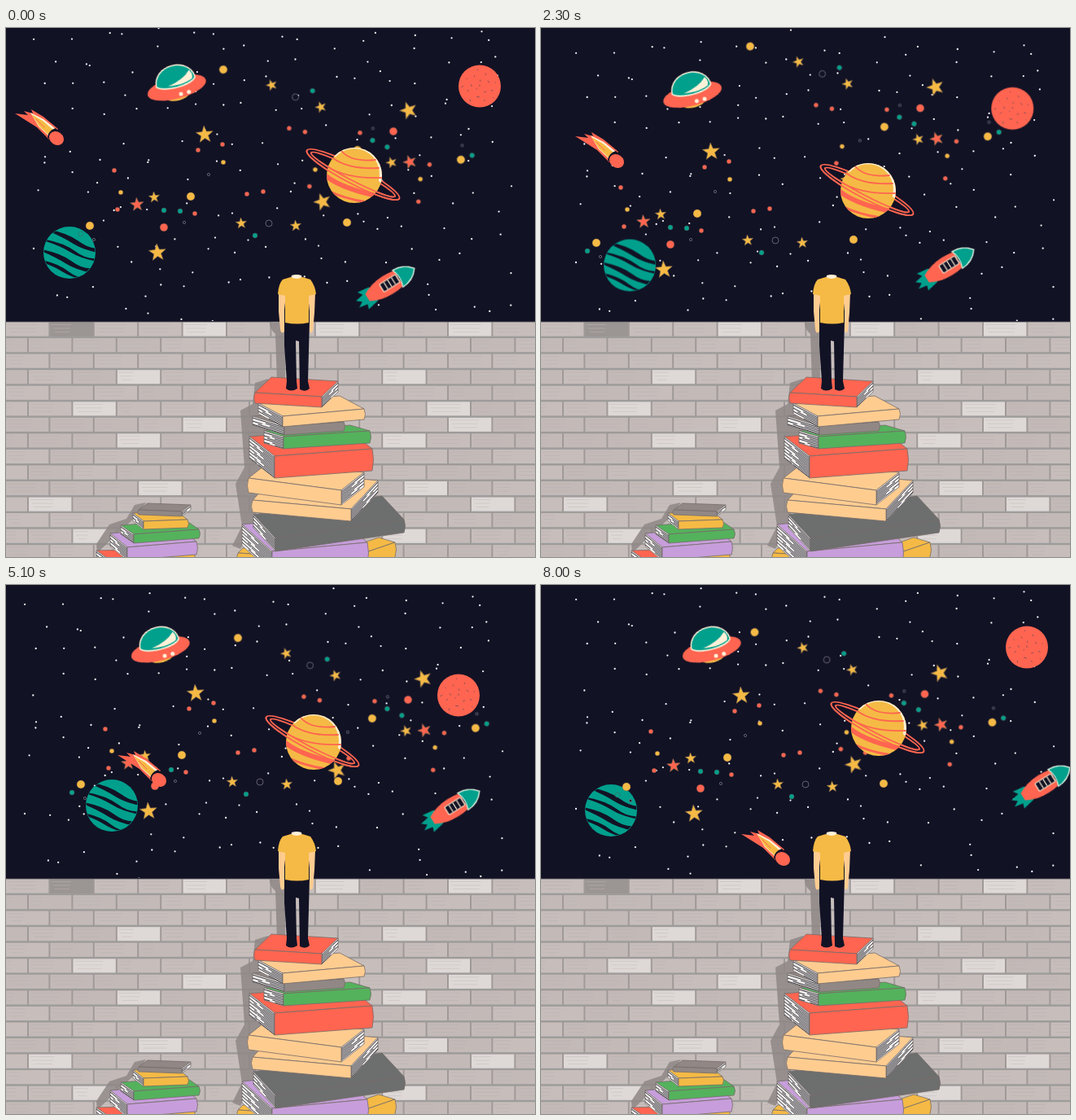
An HTML page for the animation above (8100 ms loop, 650x650 px).

```html
<!DOCTYPE html>
<html lang="en">
<head>
<meta charset="utf-8">
<title>Stacked books under the stars</title>
<style>
  html, body { margin: 0; width: 100%; height: 100%; overflow: hidden; background: #121225; }
  svg { display: block; width: 100%; height: 100%; }
  .red { fill: #ff6550; } .gold { fill: #f5ba45; } .teal { fill: #00a08d; }
  .cream { fill: #fff1d8; } .navy { fill: #121225; } .peach { fill: #ffcc90; }
  .green { fill: #54b25c; } .gray { fill: #918885; } .slate { fill: #6d6e6e; }
  .lilac { fill: #c79edb; } .paper { fill: #f1eeec; }
  .shade { fill: #8f8886; opacity: .85; }
  .line { fill: none; stroke-linecap: round; }
  .book { stroke: #756c6a; stroke-width: .8; stroke-linejoin: round; }
  .hatch { fill: none; stroke: #35323a; stroke-width: 1; }
  .mover { animation: 8.1s infinite; }
</style>
</head>
<body>
<svg viewBox="0 0 650 650">
  <defs>
    <clipPath id="globe"><circle cx="78" cy="276" r="31.500"/></clipPath>
    <clipPath id="gasball"><circle cx="428" cy="181" r="34"/></clipPath>
  </defs>
  <rect class="navy" width="650" height="650"/>
  <g id="dust" class="mover" fill="#f4f3f5"></g>

  <g id="moon" class="mover"><circle class="red" cx="582" cy="71.500" r="26"/></g>

  <g id="planet" class="mover">
    <circle class="teal" cx="78" cy="276" r="32"/>
    <g clip-path="url(#globe)" class="navy">
      <g id="bands" transform="translate(78 276) rotate(20)"></g>
    </g>
  </g>

  <g id="west" class="mover"></g>
  <g id="east" class="mover">
    <g id="turned" transform="translate(267 51) rotate(-158.500) scale(.988) translate(-419 -239)"></g>
  </g>

  <g id="comet" class="mover">
    <path class="red" d="M11 105L27 107L22 102L33 105L31 100L46 109L64 124L53 137L38 122Z"/>
    <path class="cream" d="M30 104L46 112L61 124L53 133L40 121Z"/>
    <path class="gold" d="M31 106L45 114L58 125L52 131L41 121Z"/>
    <path class="line" d="M37 112L47 122" stroke="#ff6550"/>
    <path class="navy" d="M51 134Q52 126 61 123L65 127Q56 129 54 138Z"/>
    <ellipse class="red" cx="62" cy="135.500" rx="9.500" ry="8" transform="rotate(35 62 135.500)"/>
  </g>

  <g id="saturn" class="mover">
    <g class="line" stroke="#ff6550" stroke-width="1.800" transform="rotate(27.500 426.500 180)">
      <ellipse cx="426.500" cy="180" rx="64" ry="11"/>
      <ellipse cx="426.500" cy="180" rx="58" ry="7"/>
    </g>
    <circle class="gold" cx="428" cy="181" r="34"/>
    <g clip-path="url(#gasball)" class="line" stroke="#ff6550">
      <path d="M404 155A34 34 0 0 1 461 187" stroke="#fff1d8" stroke-width="6"/>
      <path d="M412 151Q424 165 454 162M402 160Q421 174 458 172M394 170Q420 186 462 184" stroke-width="1.800"/>
      <path d="M392 181Q413 198 460 207" stroke-width="6"/>
      <path d="M396 200Q416 210 444 214" stroke-width="3"/>
    </g>
    <path class="line" d="M362.500 180A64 11 0 0 0 490.500 180M368.500 180A58 7 0 0 0 484.500 180"
      stroke="#ff6550" stroke-width="1.800" transform="rotate(27.500 426.500 180)"/>
  </g>

  <g id="ufo" class="mover">
    <g transform="rotate(-15 210 70)">
      <ellipse class="gold" cx="208" cy="84" rx="13" ry="5"/>
      <ellipse class="red" cx="209" cy="73" rx="37" ry="13.500"/>
      <path class="teal" d="M185 66C186 53 197 45.500 210 45.500S234 54 234 66C228 75 192 75 185 66Z" stroke="#fff1d8" stroke-width="1.500"/>
      <path class="cream" d="M199 69Q219 66 229 56Q233 62 230 67Q219 72 199 69Z"/>
      <circle class="cream" cx="212" cy="82" r="2.500"/>
      <circle class="cream" cx="222" cy="82" r="2.500"/>
    </g>
  </g>

  <g id="rocket" class="mover">
    <g transform="translate(467 317) rotate(-32)">
      <path class="teal" d="M-19 -10L-34 -12L-30 -6L-41 -4L-35 1L-42 5L-31 7L-33 13L-18 10L-12 0Z"/>
      <path class="red" d="M-27 -5Q-8 -16 18 -11V11Q-8 16 -27 5Z"/>
      <path class="teal" d="M17 -12Q32 -12 41 0Q32 12 17 12Q22 0 17 -12Z" stroke="#d7f0dd" stroke-width="1.300"/>
      <rect class="navy" x="-6" y="-6" width="23" height="11" rx="1" stroke="#fff1d8" stroke-width="1.200"/>
      <path class="line" d="M0 -5V4M5.500 -5V4M11 -5V4" stroke="#fff1d8" stroke-width="1.200"/>
    </g>
  </g>

  <g id="wall"><rect y="361" width="650" height="289" fill="#9f9997"/></g>
  <path class="shade" d="M324 362H343V440L333 436L331 376Q324 370 324 362Z"/>
  <path class="shade" d="M306 436L322 431V500L305 612L288 640L278 636L290 612L282 560L293 540L288 470L303 462Z"/>
  <path class="shade" d="M158 586L172 583L160 600L112 645L111 634L127 610L148 603Z"/>
  <g id="books"></g>

  <g id="person">
    <path class="peach" d="M335 325L344 328L342 346L342 373Q338 377 337 370L335 348Z"/>
    <path class="peach" d="M371 328L380 325L379 350L377 372Q375 377 373 372V348Z"/>
    <path class="navy" d="M342 360H373L371 434L373 443Q368 448 361 444L360 385L356 384L357 434L358 443Q350 448 344 443L345 434L342 390Z"/>
    <path class="cream" d="M351 304Q357 302 363 304L364 310H350Z"/>
    <path class="gold" d="M350 306Q357 310 364 306L374 309Q380 317 381 327L372 329V362Q358 365 343 362V329L334 327Q335 314 340 309Z"/>
  </g>
</svg>

<script>
const NS = 'http://www.w3.org/2000/svg';
const $ = id => document.getElementById(id);
const round = n => Math.round(n * 10) / 10;

function add(parent, tag, attrs) {
  const el = document.createElementNS(NS, tag);
  for (const k in attrs) el.setAttribute(k, attrs[k]);
  return parent.appendChild(el);
}

function seeded(s) {
  return () => (s = (s * 16807) % 2147483647) / 2147483647;
}

// White dust: one dot per jittered grid cell
function scatterDust() {
  const rnd = seeded(4127), cols = 17, rows = 11, w = 34.7, h = 36;
  for (let n = 0; n < cols * rows; n++)
    add($('dust'), 'circle', {
      cx: round(33 + (n % cols + rnd()) * w),
      cy: round(-17 + (Math.floor(n / cols) + rnd()) * h),
      r: 1.15
    });
}

function paintMoon() {
  const rnd = seeded(77);
  let d = '';
  for (let i = 0; i < 18; i++) {
    const a = i * 2.4, q = 5.4 * Math.sqrt(i);
    d += `M${round(582 + q * Math.cos(a))} ${round(71.5 + q * Math.sin(a))}l${round(rnd() * 3)} ${round(rnd() * 4 - 2)}`;
  }
  add($('moon'), 'path', { d, class: 'line', stroke: '#8d5058' });
}

function paintBands() {
  for (let i = 0; i < 4; i++) {
    const y = i * 13 - 18, t = 6 - i % 2 * 2;
    add($('bands'), 'path', { d: `M-34 ${y}Q-10 ${y - 4} 6 ${y + 1}T34 ${y}V${y + t}Q14 ${y + t + 3} 0 ${y + t}T-34 ${y + 2}Z` });
  }
}

function star(group, color, x, y, r) {
  let d = '';
  for (let i = 0; i < 10; i++) {
    const a = i * Math.PI / 5 - 1.65, q = i % 2 ? r * .42 : r;
    d += (i ? 'L' : 'M') + round(x + q * Math.cos(a)) + ' ' + round(y + q * Math.sin(a));
  }
  add(group, 'path', { d: d + 'Z', class: color, stroke: '#80694a', 'stroke-width': .7 });
}

function dot(group, color, x, y, r) {
  const look = color === 'ring'
    ? { fill: '#121225', stroke: '#77757f', 'stroke-width': .8 }
    : { class: color, stroke: '#66544a', 'stroke-width': .4 };
  add(group, 'circle', { cx: x, cy: y, r, ...look });
}

// Places are "x,y"; both clusters share this one layout
const cluster = [
  [star, 'gold', 11, '244,131 186,276'],
  [star, 'gold', 7, '182,208 289,240 356,243'],
  [star, 'red', 8.5, '161,217'],
  [dot, 'gold', 5, '227,207 419,239 103,243'],
  [dot, 'gold', 2.8, '267,165 141,202'],
  [dot, 'red', 4.8, '194,245'],
  [dot, 'red', 2.7, '133,175 236,150 266,143 137,223 232,228 296,204 316,201'],
  [dot, 'teal', 3, '194,224 214,225 306,255 92,253'],
  [dot, 'ring', 4, '323,240'],
  [dot, 'ring', 1.6, '249,180 219,239 108,260']
];

function drawCluster(group) {
  for (const [make, color, r, places] of cluster)
    for (const p of places.split(' ')) make(group, color, ...p.split(',').map(Number), r);
}

// Pale bricks per row: [first column, stride]
const pale = { 0: [4, 3], 3: [2, 6], 5: [1, 8], 6: [4, 6], 7: [2, 6], 10: [3, 6], 11: [0, 10], 13: [1, 7] };

function layBricks() {
  const wall = $('wall'), rnd = seeded(911), w = 54.4, h = 19.55;
  for (let row = 0; row < 15; row++) {
    const y = 360.5 + row * h, [first, stride] = pale[row] || [99, 1];
    for (let col = -1; col < 12; col++) {
      const x = (row % 2 ? 27 : -1) + col * w;
      const light = col >= first && (col - first) % stride === 0;
      const fill = light ? '#ded8d6' : row + col === 1 && !row ? '#9b9593' : rnd() < .5 ? '#c7bebc' : '#c3bab8';
      add(wall, 'rect', { x: round(x + 1), y: round(y + 1), width: w - 2, height: h - 2.4, fill });
      const len = 14 + rnd() * 26;
      let d = '';
      for (let k = 0; k < 3; k++) d += `M${round(x + 3 + k * 2)} ${round(y + 4 + k * 4.5)}h${round(len - k * 3)}`;
      add(wall, 'path', { d, class: 'line', stroke: light ? '#c6bfbd' : '#b9b0af', 'stroke-width': .6 });
    }
    add(wall, 'path', { d: `M0 ${round(y + h - .6)}H650`, class: 'line', stroke: '#9aa3a2', 'stroke-width': .7 });
  }
  add(wall, 'rect', { y: 360, width: 650, height: 1.2, fill: '#2b2a38' });
}

// A box: spine edge from (ax, ay) to (bx, by), depth (dx, dy), thickness h.
// Pages show on the end that the depth leans towards.
function book(color, ax, ay, bx, by, dx, dy, h) {
  const g = add($('books'), 'g', { class: 'book' });
  const [ex, ey] = dx < 0 ? [ax, ay] : [bx, by];
  const bow = dx < 0 ? 3 : -3;
  add(g, 'path', { class: color, d: `M${ax} ${ay}L${bx} ${by}l${dx} ${dy}L${ax + dx} ${ay + dy}Z` });
  add(g, 'path', { class: 'paper', d: `M${ex} ${ey}l${dx} ${dy}v${h}l${-dx} ${-dy}Z` });
  let d = '';
  for (let i = 1; i < h / 2; i++) {
    const s = .35 + i * .37 % .5;
    d += `M${ex} ${ey + i * 2}l${round(dx * s)} ${round(dy * s)}`;
    if (i % 2) d += `M${ex + dx} ${ey + dy + i * 2}l${round(-dx * .3)} ${round(-dy * .3)}`;
  }
  add(g, 'path', { class: 'hatch', d });
  const [right, left] = dx < 0 ? [bow, 0] : [0, bow];
  add(g, 'path', { class: color, d: `M${ax} ${ay}L${bx} ${by}q${right} ${h / 2} 0 ${h}L${ax} ${ay + h}q${left} ${-h / 2} 0 ${-h}Z` });
}

function pileBooks() {
  book('gold', 285, 645, 330, 648, 6, -6, 12);
  book('gold', 390, 662, 478, 632, -20, -6, 18);
  book('lilac', 327, 643, 444, 632, -37, -33, 26);
  book('slate', 331, 627, 489, 604, -27, -29, 16);
  book('peach', 303, 580, 424, 591, 33, -35, 15);
  book('peach', 298, 553, 412, 568, 28, -22, 18);
  book('red', 330, 526, 450, 517, -31, -24, 27);
  book('green', 341, 502, 447, 495, -24, -7, 15);
  book('gray', 342, 489, 415, 484, -39, -12, 11);
  book('peach', 340, 477, 440, 468, -30, -16, 13);
  book('red', 306, 448, 388, 453, 20, -19, 13);

  book('red', 128, 654, 205, 652, -17, -12, 20);
  book('gold', 170, 652, 231, 645, -20, -8, 12);
  book('lilac', 149, 638, 234, 631, -21, -17, 16);
  book('green', 157, 622, 237, 616, -16, -11, 11);
  book('gold', 169, 606, 223, 604, -13, -10, 10);
  book('gray', 163, 592, 216, 594, 11, -8, 6);
}

// Turning points: tenths of a second, then the offset from the starting place
const routes = {
  comet: '23 31 28, 34 57 47, 51 126 104, 80 235 201',
  ufo: '9 -8 -2, 34 -36 17, 51 -20 6, 62 -7 12, 80 0 6',
  saturn: '23 -26 19, 34 -45 23, 51 -50 12, 62 -18 6, 80 -13 -5',
  moon: '9 -10 10, 34 3 41, 51 -26 64, 62 3 55, 80 15 5',
  planet: '34 46 23, 51 52 -5, 62 32 -5, 80 8 1',
  rocket: '23 30 -23, 51 80 -42, 62 109 -52, 80 148 -71',
  west: '9 -19.5 7.5, 23 -35 21, 34 -32 27, 51 -11 2, 62 -32 -6, 80 2 5',
  east: '9 -6.5 -10, 23 -10 -28.5, 34 -6 -34, 51 18 14, 62 -1 15, 80 -4.5 7',
  dust: '9 -1 15, 23 9 17, 34 18 5, 51 -11 10, 62 -30 -18, 80 9 4'
};

function animate() {
  let css = '';
  for (const id in routes) {
    const keys = ('0 0 0, ' + routes[id]).split(', ').map(k => k.split(' ').map(Number));
    css += `#${id}{animation-name:go-${id}}@keyframes go-${id}{`;
    keys.forEach(([t, x, y], i) => {
      const steps = (keys[i + 1] || [81])[0] - t;
      css += `${(t / .81).toFixed(4)}%{transform:translate(${x}px,${y}px);animation-timing-function:steps(${steps})}`;
    });
    css += '100%{transform:none}}';
  }
  add(document.querySelector('svg'), 'style', {}).textContent = css;
}

scatterDust();
paintMoon();
paintBands();
drawCluster($('west'));
drawCluster($('turned'));
layBricks();
pileBooks();
animate();
</script>
</body>
</html>
```
